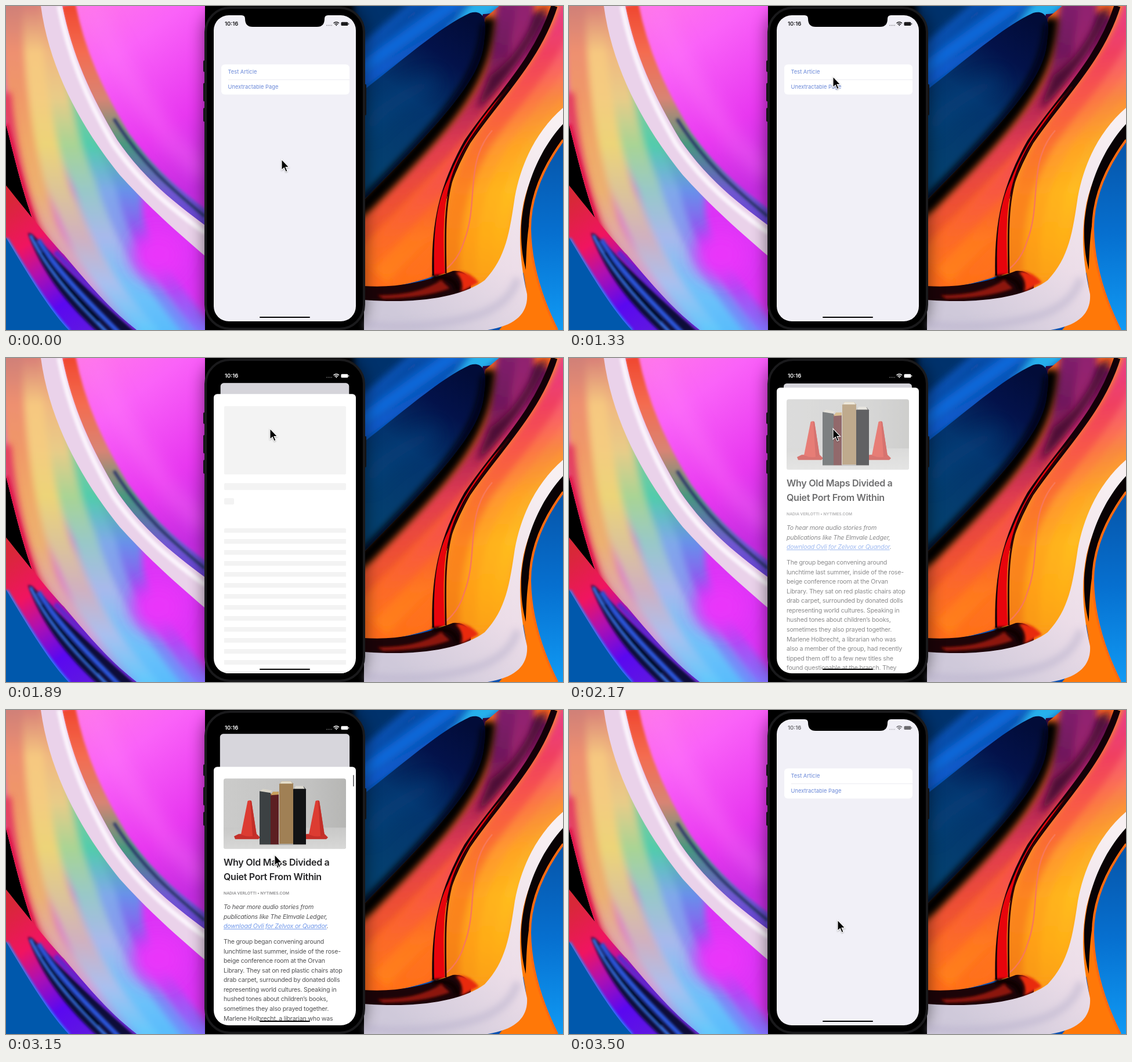
Animation, 960 px wide and 560 px high, one loop 3570 ms. Source, as an HTML page:

```html
<!DOCTYPE html>
<html lang="en">
<head>
<meta charset="utf-8">
<title>Article sheet demo</title>
<style>
html, body { margin: 0; width: 960px; height: 560px; overflow: hidden; background: #000; }
body { position: relative; font-family: Inter, sans-serif; }
div, svg { position: absolute; box-sizing: border-box; }
.wall { left: 0; top: 0; will-change: transform; }

.btn { background: #18181a; width: 4px; border-radius: 2px; }
.phone { left: 342px; top: 1px; width: 277px; height: 559px; border-radius: 44px; background: #000;
  border: 4px solid #1a1a1c; box-shadow: 0 0 26px 2px rgba(0,0,0,.45); }
.screen { left: 358px; top: 16px; width: 245px; height: 529px; border-radius: 26px; overflow: hidden; background: #000; }

.view { inset: 0; background: #f1f0f7; border-radius: 6px; overflow: hidden; transform-origin: 50% 0; }
.card { left: 12.5px; top: 85px; width: 221.5px; height: 52px; border-radius: 6px; background: #fff; overflow: hidden; }
.row { left: 0; width: 100%; height: 26px; padding-left: 12px; font-size: 9.35px; line-height: 26px; color: #6a88d8; }
.row + .row { top: 26px; }
.row + .row::before { content: ""; position: absolute; left: 12px; right: 0; top: 0; height: 1px; background: #ecebf1; }
.off .row { color: #9a9aa8; }
.row.on { background: #cbcad0; color: #b0b0b8; }
.dim { inset: 0; background: #000; }

.status { left: 0; top: 0; width: 245px; height: 30px; }
.time { left: 19px; top: 9px; font-weight: 600; font-size: 9.5px; line-height: 12px; }

.sheet { left: 0; top: 0; width: 245px; height: 529px; background: #fff; border-radius: 6px 6px 0 0; overflow: hidden; }
.bone { left: 18px; width: 210px; background: #f3f3f3; border-radius: 2px; }
.lines { height: 274px; background: repeating-linear-gradient(#f3f3f3 0 8px, #fff 8px 19px); }
.article, .skeleton { inset: 0; }
.article > div { left: 17px; white-space: pre; }
.title { top: 153.2px; font-weight: 600; font-size: 16.1px; line-height: 24.7px; letter-spacing: -.02em; color: #262628; }
.by { top: 213.5px; font-weight: 600; font-size: 6.8px; line-height: 10px; color: #8b8b8d; }
.intro, .body { font-size: 10.65px; line-height: 16.55px; letter-spacing: -.02em; color: #525254; }
.intro { top: 235.2px; font-style: italic; }
.intro span { color: #6f97ea; text-decoration: underline; }
.body { top: 295.2px; }
.photo { left: 17px; top: 20px; border-radius: 4px; }
.bar { left: 240px; top: 14px; width: 2px; height: 20px; border-radius: 1px; background: #77777a; }
.home { left: 79px; top: 520.5px; width: 87px; height: 2.5px; border-radius: 2px; background: #000; }
.notch { left: 0; top: 0; }
.cursor { left: 0; top: 0; overflow: visible; filter: drop-shadow(0 1px 1px rgba(0,0,0,.3)); }
</style>
</head>
<body>
<svg class="wall" width="960" height="560" viewBox="0 0 960 560">
  <defs id="defs">
    <filter id="b2" x="-50%" y="-50%" width="200%" height="200%"><feGaussianBlur stdDeviation="2"/></filter>
    <filter id="b6" x="-50%" y="-50%" width="200%" height="200%"><feGaussianBlur stdDeviation="6"/></filter>
    <filter id="b16" x="-80%" y="-80%" width="260%" height="260%"><feGaussianBlur stdDeviation="16"/></filter>
    <linearGradient id="band" gradientUnits="userSpaceOnUse" x1="0" y1="340" x2="150" y2="560">
      <stop stop-color="#d82838"/><stop offset=".3" stop-color="#f01460"/><stop offset=".5" stop-color="#b010b0"/><stop offset=".75" stop-color="#5a08f0"/><stop offset="1" stop-color="#6018e0"/>
    </linearGradient>
    <linearGradient id="mag" gradientUnits="userSpaceOnUse" x1="120" y1="0" x2="343" y2="300">
      <stop stop-color="#ff78e8"/><stop offset=".3" stop-color="#fa62f8"/><stop offset=".7" stop-color="#e838f0"/><stop offset="1" stop-color="#c42ce0"/>
    </linearGradient>
    <linearGradient id="navy" gradientUnits="userSpaceOnUse" x1="640" y1="290" x2="820" y2="40">
      <stop stop-color="#04406f"/><stop offset=".45" stop-color="#04356e"/><stop offset=".75" stop-color="#03124a"/><stop offset="1" stop-color="#020c38"/>
    </linearGradient>
    <linearGradient id="white" gradientUnits="userSpaceOnUse" x1="940" y1="200" x2="700" y2="550">
      <stop stop-color="#f8f0f2"/><stop offset=".6" stop-color="#ecdde8"/><stop offset="1" stop-color="#cfc9da"/>
    </linearGradient>
    <linearGradient id="sea" x1="0" y1="0" x2="0" y2="1">
      <stop stop-color="#0654a8"/><stop offset=".5" stop-color="#0670d0"/><stop offset="1" stop-color="#109af4"/>
    </linearGradient>
    <path id="inner" d="M97 0C114 85 146 155 192 232C240 302 295 343 343 379"/>
    <path id="edge" d="M0 150C6 230 25 310 48 375C72 430 130 500 190 560"/>
    <clipPath id="cR"><path d="M0 0H343V560H190C130 500 72 430 48 375C25 310 12 250 0 205Z"/></clipPath>
    <clipPath id="cM"><path d="M97 0C114 85 146 155 192 232C240 302 295 343 343 379V0Z"/></clipPath>
    <clipPath id="cB"><path d="M0 310C40 360 80 410 100 430C150 490 180 525 225 560H108C70 520 30 450 0 400Z"/></clipPath>
    <clipPath id="cW"><path d="M826 20C815 130 740 200 617 335V490C660 487 700 480 740 466C736 380 745 320 795 235C840 165 920 100 950 0H850Z"/></clipPath>
    <clipPath id="cG"><path d="M945 0C920 100 840 165 795 235C745 320 736 380 740 468L780 500H880L960 230V0Z"/></clipPath>
    <clipPath id="cN"><path d="M617 145C690 88 750 35 800 12C822 6 830 22 824 60C820 120 770 180 617 335Z"/></clipPath>
  </defs>

  <path d="M0 390V560H125Z" fill="#0058ac"/>
  <g clip-path="url(#cR)">
    <rect width="343" height="560" fill="#dc34f6"/>
    <g id="rainbow" fill="none" stroke-width="40" filter="url(#b6)"></g>
    <ellipse cx="262" cy="430" rx="46" ry="44" fill="#ea34fa" filter="url(#b16)"/>
    <use href="#edge" fill="none" stroke="#e43c5c" stroke-width="18" filter="url(#b6)"/>
    <path d="M0 205C12 250 25 310 48 375C72 430 130 500 190 560" fill="none" stroke="#e01848" stroke-width="9" filter="url(#b2)"/>
  </g>

  <g clip-path="url(#cB)">
    <rect y="300" width="240" height="260" fill="url(#band)"/>
    <path d="M45 395C90 440 150 500 235 570H165C115 525 65 470 38 392Z" fill="#080a38" filter="url(#b2)"/>
    <g fill="none" filter="url(#b2)">
      <path d="M42 396C75 465 130 520 175 565" stroke="#3a78f0" stroke-width="5"/>
      <path d="M56 404C85 455 145 515 195 565" stroke="#2c54d8" stroke-width="8"/>
      <path d="M85 425C130 475 180 520 225 560" stroke="#6428c8" stroke-width="9"/>
      <path d="M62 425C90 470 130 515 160 545" stroke="#000010" stroke-width="6"/>
      <path d="M0 402C30 452 70 522 108 562" stroke="#2c84ff" stroke-width="7"/>
    </g>
  </g>

  <g clip-path="url(#cM)">
    <rect width="343" height="400" fill="url(#mag)"/>
    <path d="M150 0Q190 110 290 240L343 290" fill="none" stroke="#ff82fa" stroke-width="26" opacity=".4" filter="url(#b16)"/>
    <g id="rim" fill="none" stroke-width="46" filter="url(#b2)"></g>
    <path d="M186 195C236 275 288 318 343 364" fill="none" stroke="#2a3468" stroke-width="5" filter="url(#b2)"/>
  </g>
  <path d="M60 0C75 110 130 210 196 292C248 350 300 395 343 432V379C295 343 240 302 192 232C146 155 114 85 97 0Z" fill="#ead2ea"/>
  <path d="M91 0C108 85 138 160 184 238C232 308 285 350 343 392" fill="none" stroke="#fbf4fc" stroke-width="8" filter="url(#b2)"/>

  <path d="M617 0H960V560H617Z" fill="#0a50b0"/>
  <g filter="url(#b6)">
    <path d="M600-10H700L600 75Z" fill="#06326c"/>
    <path d="M600 105L760-10H800L600 130Z" fill="#1068d8"/>
    <path d="M700 10L740-10L620 80Z" fill="#08469c"/>
    <path d="M760 40L805-10H870L820 24Z" fill="#28b0ec"/>
    <path d="M600 150L770 32L800 8L610 125Z" fill="#085cd0"/>
  </g>
  <path d="M822 14C838 14 850 8 862 0H950V40L880 130L780 180Z" fill="#30083a"/>
  <g clip-path="url(#cW)">
    <rect x="617" width="343" height="500" fill="#ff6c1c"/>
    <g id="warm" fill="none" stroke-width="34" filter="url(#b6)"></g>
    <path d="M935 0Q890 105 810 180L835 120Q890 80 915 10Z" fill="#4c0a34" filter="url(#b6)"/>
    <path d="M600 358L622 340C772 188 824 122 830 20" fill="none" stroke="#000" stroke-width="28" filter="url(#b6)"/>
  </g>
  <g clip-path="url(#cN)">
    <rect x="617" width="220" height="350" fill="url(#navy)"/>
    <path d="M610 342C770 180 820 120 826 30" fill="none" stroke="#00030c" stroke-width="12" filter="url(#b6)"/>
    <path d="M617 215Q660 160 740 130" fill="none" stroke="#0a4c88" stroke-width="22" opacity=".5" filter="url(#b16)"/>
  </g>

  <g clip-path="url(#cG)">
    <rect x="720" width="240" height="510" fill="#fc9c1c"/>
    <g id="gold" fill="none" stroke-width="34" filter="url(#b6)"></g>
    <path d="M838 215C790 270 815 340 790 405C780 440 760 455 740 468" fill="none" stroke="#f87858" stroke-width="2.5"/>
  </g>
  <path d="M945 0C915 95 845 160 795 235C750 315 738 380 740 466" fill="none" stroke="#140008" stroke-width="11"/>
  <path d="M868 138C820 200 785 240 768 295C752 345 754 400 756 462L738 467C736 390 742 340 762 300C785 240 820 190 868 138Z" fill="#e8040c"/>
  <path d="M866 140C820 202 788 242 770 295C755 345 757 400 758 462" fill="none" stroke="#300004" stroke-width="3"/>

  <path d="M617 484C670 487 715 480 770 458C795 455 805 475 800 492L760 508L617 512Z" fill="#1c0408"/>
  <g filter="url(#b2)">
    <path d="M640 500Q710 500 750 474L765 488Q720 505 650 506Z" fill="#8c1408"/>
    <path d="M775 460Q795 455 815 478L785 494Q790 475 775 460Z" fill="#e82c08"/>
    <path d="M735 470Q775 465 778 492" fill="none" stroke="#080002" stroke-width="9"/>
  </g>

  <path d="M960 190C915 250 890 310 885 390C884 440 896 470 897 500L850 560H960Z" fill="#ff7808"/>
  <path d="M960 176C915 215 888 270 877 330C868 390 862 435 825 474C790 500 720 516 617 508V560H830C880 552 900 530 898 498C885 440 882 390 892 340C905 285 930 250 960 226Z" fill="url(#white)"/>
  <path d="M617 550Q720 562 810 535Q870 515 882 470" fill="none" stroke="#b8b0cc" stroke-width="14" opacity=".5" filter="url(#b6)"/>
  <path d="M960 204C920 248 893 310 888 380C887 420 892 440 896 456C898 400 898 318 960 230Z" fill="#080204"/>
  <path d="M960 232C925 280 903 330 903 385C904 450 925 510 950 560H960Z" fill="url(#sea)"/>
  <path d="M960 232C925 280 903 330 903 385C904 450 925 510 950 560" fill="none" stroke="#ff6a10" stroke-width="4"/>
</svg>

<div class="btn" style="left:340px;top:94px;height:20px"></div>
<div class="btn" style="left:340px;top:133px;height:32px"></div>
<div class="btn" style="left:340px;top:176px;height:24px"></div>
<div class="btn" style="left:617px;top:135px;height:54px"></div>
<div class="phone"></div>

<div class="screen">
  <div class="view" id="view">
    <div class="card">
      <div class="row" id="first">Test Article</div>
      <div class="row">Unextractable Page</div>
    </div>
    <div class="dim" id="dim"></div>
  </div>
  <div class="status" id="status">
    <div class="time">10:16</div>
    <svg width="245" height="30" fill="currentColor">
      <path d="M194 17.5h10" stroke="currentColor" stroke-width="1.3" stroke-dasharray="1.6 1.2" opacity=".4"/>
      <path d="M206.5 13.8Q211.3 9.5 216 13.8M208.4 15.8Q211.3 13.2 214.2 15.8" fill="none" stroke="currentColor" stroke-width="1.4"/>
      <path d="M209.7 16.8Q211.3 15.6 212.9 16.8L211.3 18.5Z"/>
      <rect x="219.5" y="11.8" width="12" height="6.2" rx="1.6"/><rect x="232.2" y="13.8" width="1" height="2.2"/>
    </svg>
  </div>
  <div class="sheet" id="sheet">
    <div class="skeleton" id="skeleton">
      <div class="bone" style="top:21px;height:118px"></div>
      <div class="bone" style="top:154px;height:12px"></div>
      <div class="bone" style="top:180px;height:11px;width:17px"></div>
      <div class="bone lines" style="top:232px"></div>
    </div>
    <div class="article" id="article">
      <svg class="photo" width="211" height="121.5" viewBox="0 0 211 121.5">
        <linearGradient id="wallTone" x1="0" y1="0" x2="1" y2="0"><stop stop-color="#cbcbca"/><stop offset=".7" stop-color="#c2c2c1"/><stop offset="1" stop-color="#b6b6b4"/></linearGradient>
        <linearGradient id="floor" x1="0" y1="0" x2="0" y2="1"><stop stop-color="#c8c8c7"/><stop offset="1" stop-color="#d8d8d7"/></linearGradient>
        <rect width="211" height="122" fill="url(#wallTone)"/>
        <path d="M0 85H211V122H0Z" fill="url(#floor)"/>
        <g id="cone"><path d="M18 100L26 96H57L63 102L60 105H20Z" fill="#c4302a"/><path d="M41.5 39Q45 37 48 39L57 98Q44 103 30 97Z" fill="#dc3c32"/><path d="M46 38L48 39L57 98L50 100Z" fill="#c22e28"/></g>
        <use href="#cone" x="117"/><path d="M62 113H142V115H62Z" fill="#aaa9a7"/>
        <path d="M62 22L68 18L84 21L80 25Z" fill="#d8d4c8"/><path d="M62 22L81 25V114H62Z" fill="#3c4143"/>
        <path d="M81 27L95 23V114H81Z" fill="#5c1f22"/><path d="M81 29L85 23H95V28Z" fill="#c8a05c"/>
        <path d="M96 10L100 5H116L120 9V113H96Z" fill="#a08055"/><path d="M97 9L100 5H116L119 9Z" fill="#e6dfcc"/>
        <path d="M120 19L124 14H138L142 19V114H120Z" fill="#121315"/><path d="M121 18L124 13H137L140 18Z" fill="#dcd9d0"/>
      </svg>
      <div class="title">Why Old Maps Divided a
Quiet Port From Within</div>
      <div class="by">NADIA VERLOTTI • NYTIMES.COM</div>
      <div class="intro">To hear more audio stories from
publications like The Elmvale Ledger,
<span>download Ovli for Zelvox or Quandor</span>.</div>
      <div class="body">The group began convening around
lunchtime last summer, inside of the rose-
beige conference room at the Orvan
Library. They sat on red plastic chairs atop
drab carpet, surrounded by donated dolls
representing world cultures. Speaking in
hushed tones about children’s books,
sometimes they also prayed together.
Marlene Holbrecht, a librarian who was
also a member of the group, had recently
tipped them off to a few new titles she
found questionable at the branch. They</div>
    </div>
    <div class="bar" id="bar"></div>
  </div>
  <div class="home"></div>
  <svg class="notch" width="245" height="24"><path d="M48 0Q54 0 54 6Q54 20 67 20H178Q191 20 191 6Q191 0 197 0Z"/></svg>
</div>

<svg class="cursor" id="cursor" width="16" height="26"><path d="M0 0V18.5L4.3 14.6L7.2 21.6L10 20.4L7.1 13.6H12.8Z" stroke="#fff" stroke-width="1.1"/></svg>

<script>
const LOOP = 3570, STEP = 70;
const TAP = 1470, PRESENT = 1575, DRAG = 2950, DRAG_END = 3360, RELEASE = 3230;
const CLOSED = 529, OPEN = 35;
const $ = id => document.getElementById(id);
const [view, first, dim, status, sheet, skeleton, article, bar, cursor] =
  ['view', 'first', 'dim', 'status', 'sheet', 'skeleton', 'article', 'bar', 'cursor'].map($);

// Paint a curve whose colour runs evenly down the stage
let streaks = 0;
function streak(group, d, colors, dx = 0, dy = 0) {
  const id = 'streak' + streaks++, list = colors.split(' ');
  const stops = list.map((c, i) => `<stop offset="${i / (list.length - 1)}" stop-color="#${c}"/>`).join('');
  $('defs').insertAdjacentHTML('beforeend',
    `<linearGradient id="${id}" gradientUnits="userSpaceOnUse" x1="0" y1="${-dy}" x2="0" y2="${560 - dy}">${stops}</linearGradient>`);
  $(group).insertAdjacentHTML('beforeend',
    `<path d="${d}" transform="translate(${dx} ${dy})" stroke="url(#${id})"/>`);
}

streak('rainbow', 'M130 170C160 250 185 290 215 330C205 400 270 480 345 570', 'e89078 e89078 e0a080 58c8a0 6890ea 9450f0 b844f4 8070fa');
streak('rainbow', 'M95 60C110 180 140 260 170 320C185 400 230 480 320 585', 'e89078 eca080 88cc98 50ccac 80a8ea 8894f0 8088f6 6c90fa');
streak('rainbow', 'M68 -20C80 140 100 230 135 310C160 390 200 470 290 580', 'e08c78 f0b880 e8cc88 a8d494 98c8c8 a8b8ec 74c4f8 58bcfc');
streak('rainbow', 'M38 -20C45 150 70 270 105 350C135 430 180 500 250 575', 'd88078 f6c880 f4cc80 ecd478 dcc498 d0b0c0 a8c0f0 60c8fc');
streak('rainbow', 'M8 -20C10 180 40 300 70 380C100 450 150 510 215 575', 'd08078 ee9070 f09868 f0a868 ecb070 e0a8a8 d0a0d8 70a8f8');
streak('rim', 'M97 0C114 85 146 155 192 232C240 302 295 343 343 379', 'f04830 f46c50 d88474 489880 7058d0 6038d0 5030c0 5030c0');

const shore = 'M560 392L617 335C770 180 822 120 826 30L840 -60';
streak('warm', shore, 'ff8020 f87020 f04060 f44c50 f85838 ff7420 ff7018 ff7018', 112, 100);
streak('warm', shore, '581050 801858 d02c60 f44454 f85c34 ff7820 ff8018 ff8018', 84, 75);
streak('warm', shore, '902070 98206c e03064 f44858 f85840 fc6a28 ff7418 ff7418', 56, 50);
streak('warm', shore, '80206c 70185c b02454 e03c50 ec4c38 f05a28 f06020 f06020', 28, 25);

const vein = 'M960 -50L945 0C915 95 845 160 795 235C750 315 738 380 740 466';
streak('gold', vein, 'ff58b8 ff6880 fc9038 fcac28 ffbc20 ffb018 fca010 f89810', 110);
streak('gold', vein, 'ff50b0 ff6878 f88840 ffa424 ffb41c ffac18 fca010 f89810', 82);
streak('gold', vein, 'ff48a8 f85c70 fc7844 ff9830 ffa820 ffa018 f89810 f89810', 54);
streak('gold', vein, 'e83c88 f04060 f85848 fa7030 fc8420 f88418 f07c18 f07818', 26);

const ramp = (t, a, b) => Math.min(1, Math.max(0, (t - a) / (b - a)));
const smooth = x => x * x * (3 - 2 * x);
const mix = (a, b, k) => a + (b - a) * k;
// Critically damped spring from 0 to 1
const spring = (ms, w) => ms <= 0 ? 0 : 1 - Math.exp(-w * ms / 1000) * (1 + w * ms / 1000);

const dragged = t => 160 * ramp(t, DRAG, DRAG_END) ** 1.7;

function pointer(t) {
  const up = smooth(ramp(t, 660, 1230)), down = smooth(ramp(t, 2400, 2850));
  return [475 - 20 * up + 8 * down, 265 - 143 * up + 81 * down + dragged(t)];
}

function sheetTop(t) {
  if (t < DRAG) return mix(CLOSED, OPEN, spring(t - PRESENT, 18));
  const y = OPEN + dragged(Math.min(t, RELEASE));
  return mix(y, CLOSED, spring(t - RELEASE, 30));
}

function draw(t) {
  const y = sheetTop(t);
  let p = (CLOSED - y) / (CLOSED - OPEN);
  if (p < .01) p = 0;

  view.style.transform = `translateY(${28 * p}px) scale(${1 - .098 * p})`;
  view.classList.toggle('off', p > 0);
  first.classList.toggle('on', t >= TAP && t < 2100);
  dim.style.opacity = .12 * p;

  sheet.style.visibility = p ? 'visible' : 'hidden';
  sheet.style.transform = `translateY(${y}px)`;
  skeleton.style.opacity = 1 - ramp(t, 1960, 2030);
  article.style.opacity = ramp(t, 2030, 2240);
  bar.style.opacity = ramp(t, DRAG, DRAG + 100);

  const light = t >= 1700 && t < 3400;
  status.style.color = light ? '#fff' : '#1a1a1c';
  status.style.opacity = light ? ramp(t, 1690, 1850) : t < 1700 ? 1 : ramp(t, 3400, 3560);

  const [cx, cy] = pointer(t);
  cursor.style.transform = `translate(${cx}px, ${cy}px)`;
}

function tick() {
  draw(Math.floor(performance.now() % LOOP / STEP) * STEP);
  requestAnimationFrame(tick);
}
tick();
</script>
</body>
</html>
```
